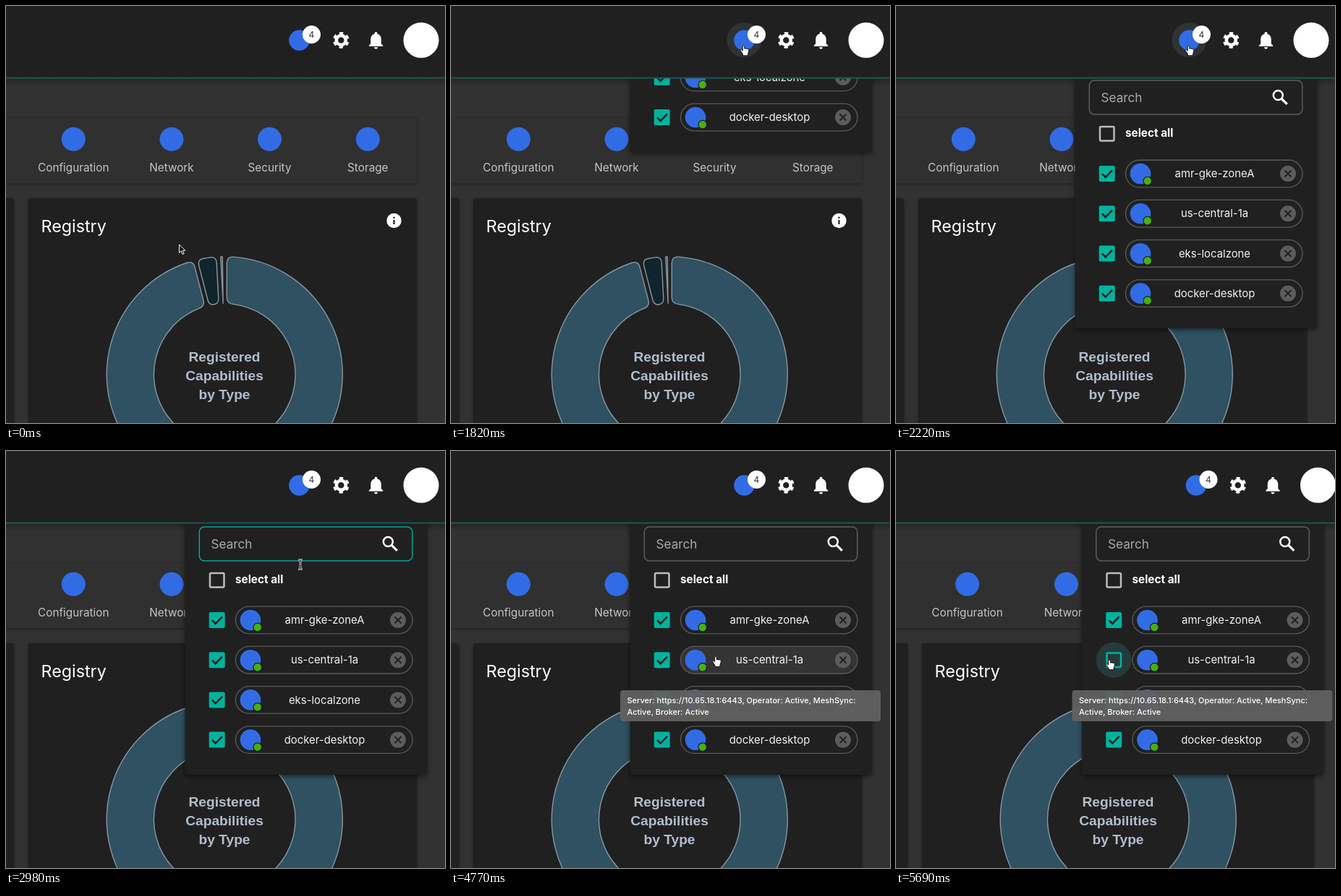
An HTML page for the animation above (5.75 s loop, 607 by 577 pixels).

```html
<!DOCTYPE html>
<html lang="en">
<head>
<meta charset="utf-8">
<title>Cluster selector</title>
<style>
html, body { margin: 0; width: 100%; height: 100%; overflow: hidden; background: #323232; }
svg { display: block; width: 607px; height: 577px; font-family: Inter, Lato, sans-serif; }
.mid { text-anchor: middle; }
.card { fill: #202020; filter: drop-shadow(0 1px 2px #0006); }
.blue { fill: #326ce5; }
.white { fill: #fff; }
.label { font-size: 15.3px; fill: #c4c4c4; text-anchor: middle; }
.chip { stroke: #5a5a5a; stroke-width: 1.3; fill: none; }
.slice { stroke: #8797a1; stroke-width: 1.4; }
.teal { fill: #00b39f; }
.line { fill: none; stroke-width: 2.5; }
</style>
</head>
<body>
<svg viewBox="0 0 607 577">
  <defs>
    <clipPath id="below"><rect y="100" width="607" height="477"/></clipPath>
    <linearGradient id="shade" x2="0" y2="1">
      <stop stop-color="#000" stop-opacity=".28"/><stop offset="1" stop-color="#000" stop-opacity="0"/>
    </linearGradient>
  </defs>
  <rect width="607" height="577" fill="#323232"/>
  <rect y="100" width="607" height="11" fill="url(#shade)"/>
  <rect id="tabs" class="card" x="-10" y="155" width="578" height="90" rx="3" style="fill:#303030"/>
  <g id="nav"></g>
  <g id="body">
    <rect class="card" x="-20" y="266" width="31" height="330" rx="4"/>
    <rect id="card" class="card" x="31" y="266" width="537" height="330" rx="4"/>
    <text x="48.5" y="313" font-size="23.3" class="white">Registry</text>
    <circle cx="536.5" cy="297" r="10.2" class="white"/>
    <path d="M536.5 296v6M536.5 291.7v2.2" stroke="#202020" stroke-width="2.2"/>
    <g id="donut"></g>
    <g class="mid" font-family="'Liberation Sans', Arial, sans-serif" font-weight="700" font-size="19.2" fill="#b0bdcc">
      <text x="302" y="491.5">Registered</text>
      <text x="302" y="517.5">Capabilities</text>
      <text x="302" y="543.5">by Type</text>
    </g>
  </g>
  <g clip-path="url(#below)">
    <g id="menu">
      <rect class="card" x="247.5" y="60" width="334.5" height="388" rx="4" style="filter:drop-shadow(0 2px 3px #0008)"/>
      <rect id="field" x="267.3" y="105" width="294.5" height="47" rx="7" fill="none" stroke-width="1.5"/>
      <text x="283.5" y="135" font-size="17.2" fill="#a9a9a9">Search</text>
      <g class="line" stroke="#fff"><circle cx="528.3" cy="125.5" r="6.5"/><path d="M533 130.2l7.8 7.6" stroke-width="3.2"/></g>
      <rect class="line" x="282" y="169" width="19.5" height="19.5" rx="1.5" stroke="#bcbcbc"/>
      <text x="317" y="183" font-size="15.3" font-weight="700" class="white">select all</text>
      <circle id="ripple" cx="291.5" cy="289.2" r="24.5"/>
      <g id="rows"></g>
    </g>
  </g>
  <rect width="607" height="99" fill="#202020"/>
  <rect y="98.6" width="607" height="1.9" fill="#1d5a53"/>
  <g id="bar">
    <circle id="halo" cx="405.5" cy="47" r="24" fill="#9cc9c4" fill-opacity=".11"/>
    <circle cx="405.5" cy="47.5" r="14.3" class="blue"/>
    <circle cx="422.5" cy="39.5" r="12.5" class="white"/>
    <text x="422.3" y="43.7" font-size="12" class="mid" fill="#303030">4</text>
    <g transform="translate(463.3 47.3) rotate(15)" fill="none" stroke="#fff">
      <circle r="6.5" stroke-width="4.6"/>
      <circle r="9.4" stroke-width="4" stroke-dasharray="4.92"/>
    </g>
    <path class="white" transform="translate(497 32.8) scale(1.21)" d="M12 22c1.1 0 2-.9 2-2h-4c0 1.1.9 2 2 2zm6-6v-5c0-3.07-1.63-5.64-4.5-6.32V4c0-.83-.67-1.5-1.5-1.5s-1.5.67-1.5 1.5v.68C7.64 5.36 6 7.92 6 11v5l-2 2v1h16v-1l-2-2z"/>
    <circle cx="574" cy="47.3" r="24.5" class="white"/>
  </g>
  <g id="tip">
    <rect x="234" y="331" width="360" height="43" rx="4" fill="#616161" fill-opacity=".94"/>
    <g font-size="11" font-weight="500" class="white">
      <text x="243.5" y="348.5">Server: https://10.65.18.1:6443, Operator: Active, MeshSync:</text>
      <text x="243.5" y="365.3">Active, Broker: Active</text>
    </g>
  </g>
  <g id="cursor" stroke-linejoin="round">
    <path id="arrow" d="M0 0V11.5L2.7 9 4.6 13.5 6.6 12.6 4.7 8.3H8.3Z" fill="#111" stroke="#fff"/>
    <path id="hand" d="M-1.3 .8V7L-3 5.6C-4.5 5-4.8 6.3-4 7.2L-1 11.5V13.7H6V11.5L7.3 8V5C7.3 3.6 5.5 3.6 5.3 4.8 5 3.4 3.4 3.4 3.2 4.5 3 3.3 1.5 3.3 1.3 4.2V.8C1.3-.4-1.3-.4-1.3.8Z" fill="#fff" stroke="#111"/>
    <g id="beam" fill="none">
      <path d="M-3-6.5Q0-6.5 0-4Q0-6.5 3-6.5M0-4V4M-3 6.5Q0 6.5 0 4Q0 6.5 3 6.5M-1.5 1.5h3" stroke="#fff" stroke-width="2.6"/>
      <path d="M-3-6.5Q0-6.5 0-4Q0-6.5 3-6.5M0-4V4M-3 6.5Q0 6.5 0 4Q0 6.5 3 6.5M-1.5 1.5h3" stroke="#111"/>
    </g>
  </g>
</svg>
<script>
const LOOP = 5750, UNCHECK = 5520, SHIFT = 5630;
const $ = id => document.getElementById(id);
const set = (id, name, value) => $(id).setAttribute(name, value);
const move = (id, x, y = 0) => set(id, 'transform', `translate(${x} ${y})`);
const show = (id, on) => set(id, 'opacity', +on);
const ramp = (t, a, b) => Math.min(1, Math.max(0, (t - a) / (b - a)));

const tabs = [['Configuration', 93.3, 5.3], ['Network', 229, 6.5], ['Security', 364.5, 8], ['Storage', 500.3, 9.3]];
$('nav').innerHTML = tabs.map(([name, x], i) => `<g id="tab${i}">
  <circle cx="${x}" cy="184.3" r="16.5" class="blue"/>
  <text x="${x}" y="228.5" class="label">${name}</text></g>`).join('');

const clusters = ['amr-gke-zoneA', 'us-central-1a', 'eks-localzone', 'docker-desktop'];
const rowY = i => 234 + i * 55.2;
$('rows').innerHTML = clusters.map((name, i) => `<g transform="translate(0 ${rowY(i)})">
  <g id="on${i}"><rect class="teal" x="280.7" y="-11" width="22" height="22" rx="2"/>
    <path class="line" d="M285 .2l4.7 4.7 9.3-9.5" stroke="#202020"/></g>
  <rect id="off${i}" class="line" x="282" y="-9.8" width="19.5" height="19.5" rx="1.5" stroke="#00b39f" opacity="0"/>
  <rect id="chip${i}" class="chip" x="317.5" y="-18.8" width="244.5" height="37.6" rx="18.8"/>
  <circle cx="338" cy="0" r="14.3" class="blue"/>
  <circle cx="347.8" cy="10" r="5.8" fill="#46b012" stroke="#202020" stroke-width="1.2"/>
  <text x="440.5" y="5.2" font-size="14.9" class="mid" fill="#f2f2f2">${name}</text>
  <circle cx="542" cy="0" r="11" fill="#5c5c5c"/>
  <path d="M537.5-4.5l9 9m0-9l-9 9" stroke="#202020" stroke-width="2"/></g>`).join('');

// Ring slice between two angles (degrees from the top), with a parallel gap and rounded corners
function slice(from, to, corner, fill) {
  const R = 163, r = 97.8, gap = 3, rad = Math.PI / 180;
  const at = (d, a) => `${302.3 + d * Math.sin(a)} ${509.7 - d * Math.cos(a)}`;
  const a = d => from * rad + gap / d, b = d => Math.max(a(d), to * rad - gap / d);
  const o = R - corner, i = r + corner, turnO = corner / R, turnI = Math.min(corner / r, (b(r) - a(r)) / 2);
  const big = +(to - from > 180);
  return `<path class="slice" fill="${fill}" d="M${at(o, a(o))}Q${at(R, a(R))} ${at(R, a(R) + turnO)}
    A${R} ${R} 0 ${big} 1 ${at(R, b(R) - turnO)}Q${at(R, b(R))} ${at(o, b(o))}
    L${at(i, b(i))}Q${at(r, b(r))} ${at(r, b(r) - turnI)}
    A${r} ${r} 0 ${big} 0 ${at(r, a(r) + turnI)}Q${at(r, a(r))} ${at(i, a(i))}Z"/>`;
}
$('donut').innerHTML = slice(0, 345.6, 9, '#2f5161') + slice(-14.4, -3, 8, '#10242d') + slice(-3, 0, 1, '#2f5161');

// Pointer path: time, x, y
const path = [[0, 239.5, 330], [30, 239.5, 330], [580, 394, 99], [750, 381, 86], [920, 392.7, 70],
  [1160, 404.5, 55], [2470, 404.5, 55], [2980, 407, 157], [3060, 407, 161], [3620, 410, 282],
  [4560, 410, 282], [5110, 295, 289], [LOOP, 295, 289]];
function pointer(t) {
  const k = path.findIndex(p => p[0] > t), [t0, x0, y0] = path[k - 1], [t1, x1, y1] = path[k];
  const f = (t - t0) / (t1 - t0);
  return [x0 + (x1 - x0) * f, y0 + (y1 - y0) * f];
}

function draw(t) {
  const [x, y] = pointer(t), open = t >= 1220, shifted = t >= SHIFT, dx = shifted ? 9.5 : 0;

  // The menu peeks out, rests, then slides down
  const left = 1 - ramp(t, 1755, 2260);
  const lift = t < 1755 ? 348 - 23 * ramp(t, 1170, 1340) : 325 * left * left;
  move('menu', dx, -lift);
  show('menu', open);

  move('bar', dx);
  move('tip', dx);
  move('body', shifted ? 5 : 0);
  set('card', 'width', shifted ? 542 : 537);
  set('tabs', 'width', 578 + dx);
  tabs.forEach((tab, i) => move('tab' + i, shifted ? tab[2] : 0));

  show('halo', ramp(t, 980, 1130) * (1 - ramp(t, 2510, 2680)));
  show('tip', ramp(t, 3560, 3680));

  const inField = t > 2500 && y > 104 && y < 160;
  set('field', 'stroke', inField ? '#00a896' : '#5c5c5c');
  let overChip = false;
  clusters.forEach((_, i) => {
    const over = open && x > 317 && Math.abs(y + 3 - rowY(i)) < 19;
    overChip ||= over;
    $('chip' + i).style.fill = over ? '#343434' : 'none';
  });

  const overBox = t > 4900 && x < 315, off = t >= UNCHECK;
  show('on1', !off);
  show('off1', off);
  show('ripple', overBox);
  set('ripple', 'fill', off ? '#263b39' : '#25292c');

  const overIcon = Math.hypot(x - 405.5, y - 47) < 24;
  const kind = inField ? 'beam' : overIcon || overChip || overBox ? 'hand' : 'arrow';
  for (const id of ['arrow', 'hand', 'beam']) show(id, id === kind);
  move('cursor', x, y);
}

const start = performance.now();
(function tick() {
  draw((performance.now() - start) % LOOP);
  requestAnimationFrame(tick);
})();
</script>
</body>
</html>
```
